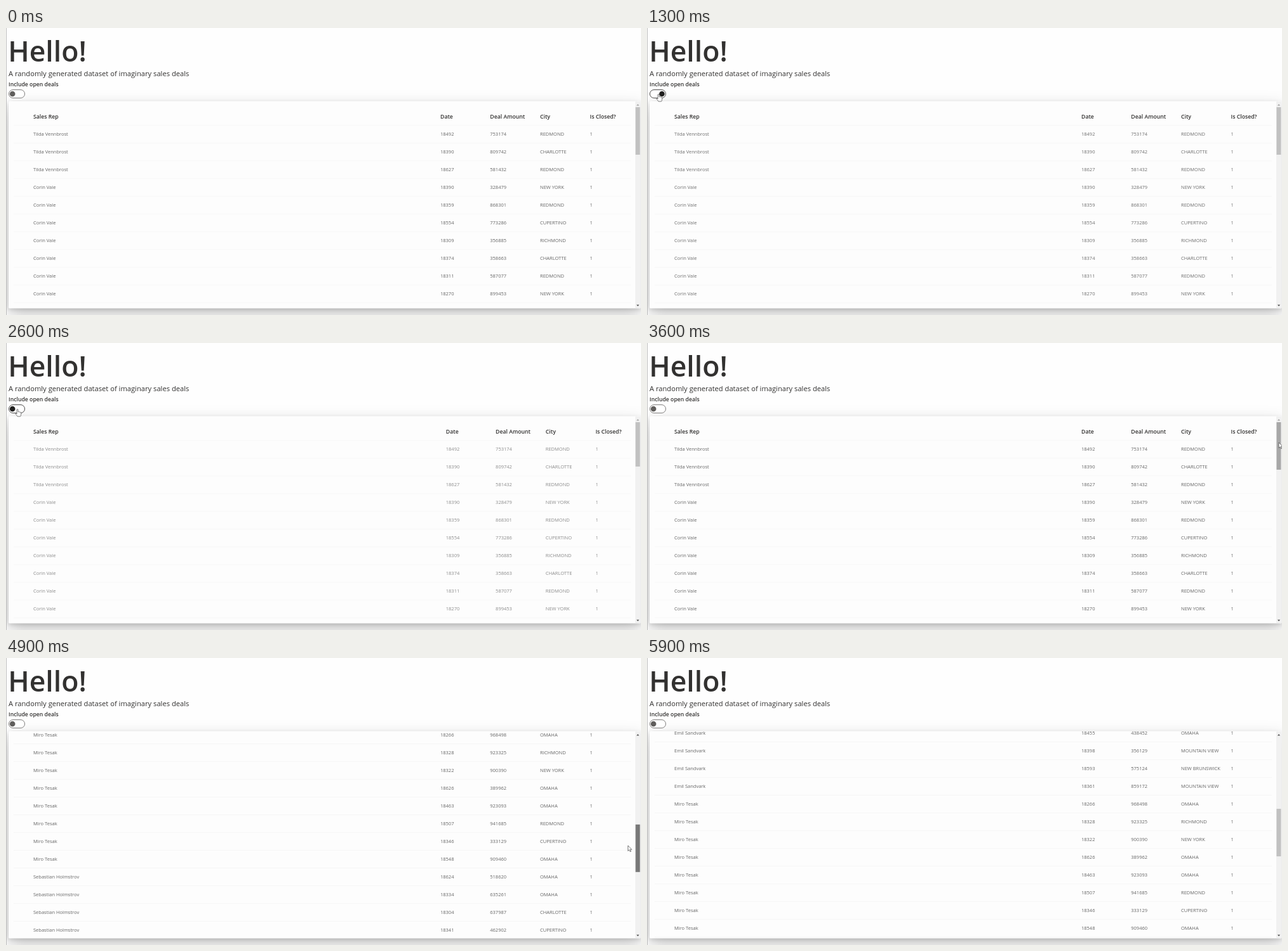
Recreate the animation shown at these times as an HTML page. Size 1000 by 453 pixels, loop 6600 ms.

```html
<!DOCTYPE html>
<html lang="en">
<head>
<meta charset="utf-8">
<title>Sales deals</title>
<style>
  html, body { margin: 0; width: 100%; height: 100%; overflow: hidden; background: #fff; }
  svg { display: block; width: 100vw; height: 100vh; }
  text { font-family: "Open Sans", "Noto Sans", sans-serif; fill: #323130; }
  .bold { font-weight: 600; font-size: 8.7px; }
  .cell { font-size: 7.5px; fill: #666; }
  .card { fill: #fdfdfd; filter: drop-shadow(0 2px 3px rgba(0,0,0,.14)) drop-shadow(0 10px 13px rgba(0,0,0,.22)); }
</style>
</head>
<body>
<svg id="stage" viewBox="0 0 1000 453" preserveAspectRatio="none">
  <defs><clipPath id="view"><rect x="4" y="115.5" width="987" height="327"/></clipPath></defs>
  <rect width="1000" height="453" fill="#fefefe"/>
  <rect class="card" x="4" y="115.5" width="995.5" height="327" rx="1.5"/>
  <rect width="0.8" height="453" fill="#b0b0b0"/>
  <text x="3.2" y="52.7" font-size="44.6" font-weight="600">Hello!</text>
  <text x="4" y="75.5" font-size="11.17">A randomly generated dataset of imaginary sales deals</text>
  <text class="bold" x="4" y="91.5">Include open deals</text>
  <rect id="pill" x="4.5" y="97.5" width="25" height="13" rx="6.5" fill="#fff"/>
  <circle id="knob" cy="104" r="4.3"/>
  <g clip-path="url(#view)"><g id="table"><g id="head"></g><g id="rows"></g></g></g>
  <rect x="991" y="116" width="8.5" height="326" fill="#f1f1f1"/>
  <rect id="thumb" x="991.4" width="7"/>
  <path id="up" d="M992.9 122.4h4.2l-2.1-2.4z"/>
  <path d="M992.9 436.8h4.2l-2.1 2.4z" fill="#505050"/>
  <g id="cursor" stroke="#444" stroke-width=".7" stroke-linejoin="round" fill="#fff">
    <path id="arrow" d="M0 0v8.6l2-1.8 1.4 3 1.4-.6-1.4-2.9h2.6z"/>
    <path id="hand" d="M-1 1q0-1 1-1t1 1v3.2q1-.6 1.6.2 1-.5 1.6.3 1.5-.3 1.5 1.2v2.2q0 1.6-1 3.3h-4.7q-1.2-2-3-4 0-1.4 1.3-1l.7.8z"/>
  </g>
</svg>
<script>
const LOOP = 6600, STEP = 100;
const ROW_H = 28, FIRST_Y = 167.5, SHIFT = 8.8;
const COLS = [43, 684, 762.3, 841, 919.6];
const HEADS = ["Sales Rep", "Date", "Deal Amount", "City", "Is Closed?"];
const CITIES = {
  R: "REDMOND", C: "CHARLOTTE", N: "NEW YORK", U: "CUPERTINO",
  H: "RICHMOND", O: "OMAHA", M: "MOUNTAIN VIEW", B: "NEW BRUNSWICK"
};
// Each rep owns the rows up to the given index.
const REPS = [[3, "Tilda Vennbrost"], [12, "Corin Vale"], [20, "Emil Sandvark"],
  [28, "Miro Tesak"], [99, "Sebastian Holmstrov"]];
const TOP = "18492 753174 R,18390 809742 C,18627 581432 R,18390 328479 N,18359 868301 R," +
  "18554 773286 U,18309 356885 H,18374 358663 C,18311 587077 R,18270 899453 N";
const MIDDLE = "18455 438452 O,18398 356129 M,18593 575124 B,18361 859172 M,18266 968498 O," +
  "18328 923325 H,18322 900390 N,18626 389962 O,18463 923093 O,18507 941685 R,18346 333129 U," +
  "18548 909460 O,18624 518620 O,18334 635261 O,18304 637987 C,18341 462902 U";

// Tracks: [time, value, ...]
const SCROLL = [[3800, 0], [4000, 90], [4300, 470], [4500, 598.5], [5300, 614.2], [5500, 497.5]];
const POINTER = [[300, 420, 440], [900, 30, 120], [1100, 18, 104.5], [2800, 18, 104.5],
  [3500, 995, 157], [3800, 995, 157], [4500, 982.5, 296], [5300, 976.5, 296],
  [5500, 978, 270], [5700, 978, 270], [5800, 995, 274]];
const FADE = [[1200, 1], [1300, .95], [1600, .5], [1700, 1], [2500, 1], [2600, .75], [2700, .5], [2800, 1]];

const $ = id => document.getElementById(id);
const set = (el, attrs) => { for (const k in attrs) el.setAttribute(k, attrs[k]); return el; };
const add = (parent, tag, attrs) =>
  parent.appendChild(set(document.createElementNS("http://www.w3.org/2000/svg", tag), attrs));

let seed = 7;
const random = n => (seed = seed * 16807 % 2147483647) % n;

const moving = [];
function label(parent, col, y, text, cls) {
  const el = add(parent, "text", { x: COLS[col], y, class: cls });
  el.textContent = text;
  if (col) moving.push([el, COLS[col]]);
}

function buildTable() {
  const filler = n => Array.from({ length: n }, () =>
    `${18262 + random(366)} ${300000 + random(690000)} ${"RCNUHOMB"[random(8)]}`);
  const deals = [...TOP.split(","), ...filler(6), ...MIDDLE.split(","), ...filler(8)];
  HEADS.forEach((h, c) => label($("head"), c, 143.3, h, "bold"));
  deals.forEach((deal, i) => {
    const y = FIRST_Y + i * ROW_H;
    const [date, amount, city] = deal.split(" ");
    const rep = REPS.find(r => i < r[0])[1];
    add($("rows"), "rect", { x: 12, y: y - 14, width: 972, height: .7, fill: "#f4f4f4" });
    [rep, date, amount, CITIES[city], "1"].forEach((v, c) => label($("rows"), c, y + 2.5, v, "cell"));
  });
}

function at(track, t) {
  if (t <= track[0][0]) return track[0].slice(1);
  const i = track.findIndex(k => k[0] > t);
  if (i < 0) return track[track.length - 1].slice(1);
  const a = track[i - 1], b = track[i], p = (t - a[0]) / (b[0] - a[0]);
  return a.slice(1).map((v, j) => v + (b[j + 1] - v) * p);
}

const within = (t, from, to) => t >= from && t < to;

function draw(t) {
  const on = within(t, 1300, 2500);
  const hover = within(t, 1000, 2900);
  const ink = hover ? "#201f1e" : "#605e5c";
  set($("pill"), { stroke: ink, "stroke-width": .8 });
  set($("knob"), { cx: on ? 23.5 : 10.2, fill: ink });

  const allDeals = within(t, 1700, 2800);
  for (const [el, x] of moving) el.setAttribute("x", allDeals ? x + SHIFT : x);
  set($("rows"), { opacity: at(FADE, t)[0] });

  const [scroll] = at(SCROLL, t);
  set($("table"), { transform: `translate(0 ${-scroll})` });
  const grip = within(t, 3900, 5800) ? "#787878"
    : within(t, 3500, 3900) || within(t, 5800, 5900) ? "#a8a8a8" : "#c1c1c1";
  set($("thumb"), { y: 125 + scroll / 4.4, height: allDeals ? 70 : 75, fill: grip });
  set($("up"), { fill: scroll ? "#505050" : "#a3a3a3" });

  const [x, y] = at(POINTER, t);
  set($("cursor"), {
    transform: `translate(${x} ${y})`,
    visibility: within(t, 300, 5900) ? "visible" : "hidden"
  });
  set($("arrow"), { display: hover ? "none" : "inline" });
  set($("hand"), { display: hover ? "inline" : "none" });
}

buildTable();
const start = performance.now();
function tick() {
  const t = (performance.now() - start) % LOOP;
  draw(Math.floor(t / STEP) * STEP);
  requestAnimationFrame(tick);
}
tick();
</script>
</body>
</html>
```
